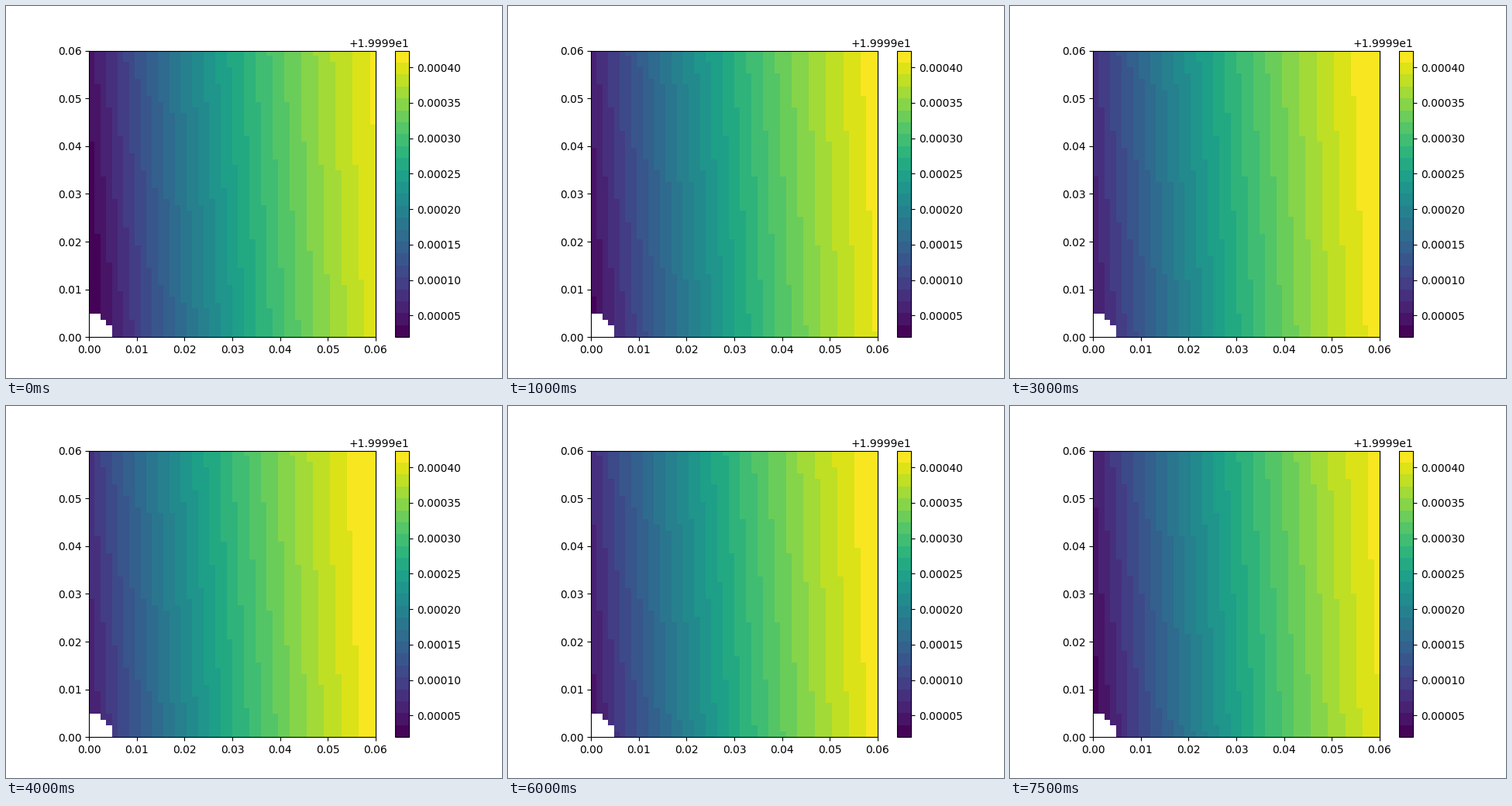
A matplotlib script that plays this animation: 640x480 px, repeating every 8 s.

```python
import numpy as np
import matplotlib.pyplot as plt
from matplotlib.animation import FuncAnimation
from matplotlib.colors import ListedColormap

SIZE = 0.06          # side of the plate
CELLS = 50
HOLE = 0.005         # radius of the cut-out corner
LOW, SPAN = 19.9990197, 0.0004038
FRAMES, STEP = 16, 500
PEAK = 4.1           # seconds, warmest moment

axis = (np.arange(CELLS) + 0.5) / CELLS
X, Y = np.meshgrid(axis, axis)
hole = np.hypot(X, Y) * SIZE < HOLE


def field(i):
    """Concave warm front, slightly tilted, that drifts left and back."""
    t = i * STEP / 1000
    tilt = (0.065 - 0.016 * X) * (1 - Y)
    u = X + 0.125 - tilt - 0.0048 * (t - PEAK) ** 2
    level = 1.271 * u - 0.3256 * u ** 2
    return np.ma.array(LOW + SPAN * level, mask=hole)


bands = ListedColormap(plt.get_cmap("viridis")(np.linspace(0.01, 0.99, 24)))
bands.set_bad("white")

fig, ax = plt.subplots(figsize=(6.4, 4.8), dpi=100)
image = ax.imshow(field(0), cmap=bands, vmin=LOW, vmax=LOW + SPAN,
                  origin="lower", extent=(0, SIZE, 0, SIZE),
                  interpolation="nearest")
fig.colorbar(image, ax=ax)


def update(i):
    image.set_data(field(i))
    return [image]


anim = FuncAnimation(fig, update, frames=FRAMES, interval=STEP,
                     repeat=True, repeat_delay=0, blit=False)
plt.show()
```
